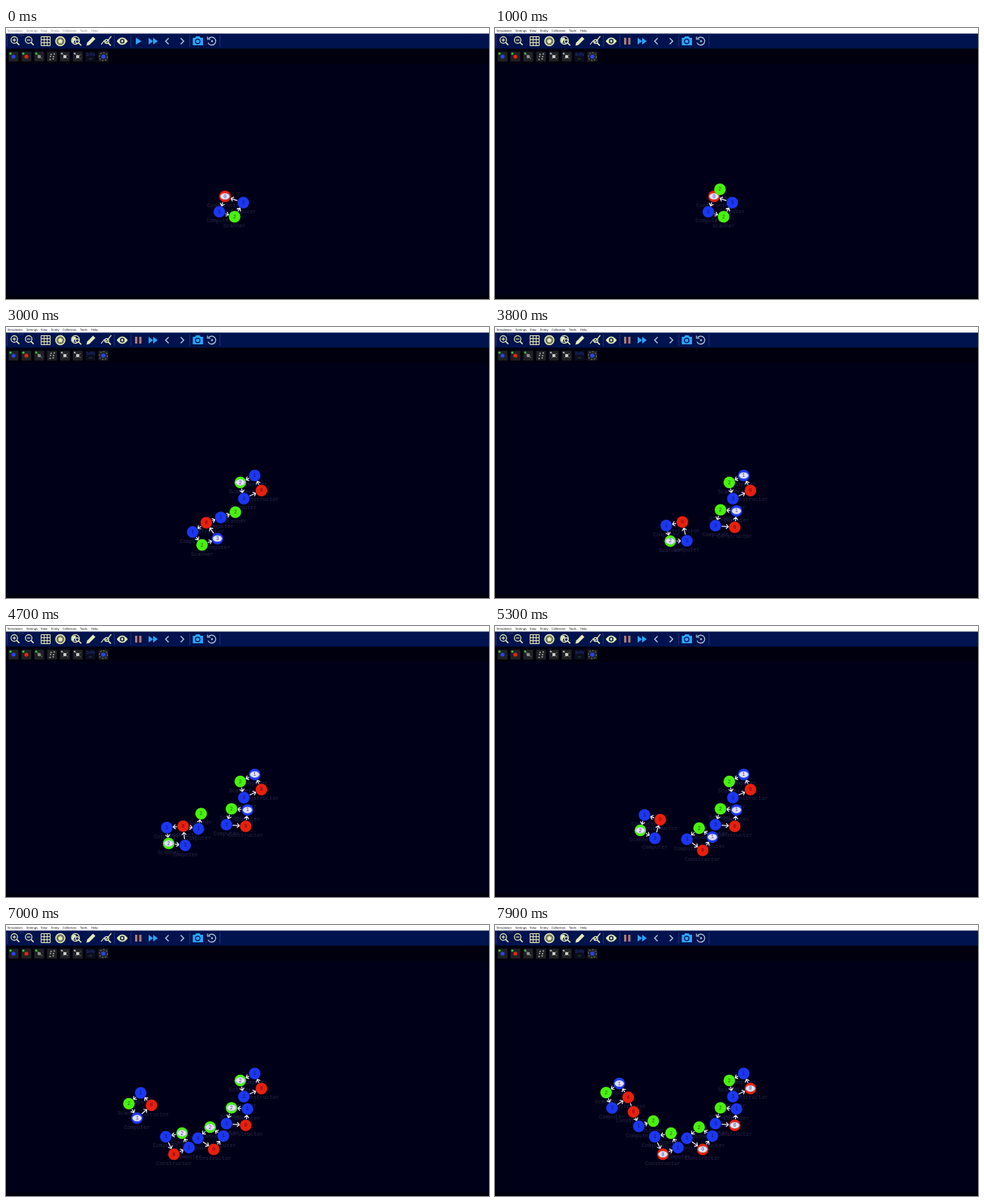
Write an HTML page with a canvas that moves like this. It is 640 px wide and 360 px high and loops after 8000 ms.

```html
<!DOCTYPE html>
<html lang="en">
<head>
<meta charset="utf-8">
<title>Cell replication</title>
<style>
html, body { margin: 0; width: 100%; height: 100%; overflow: hidden; background: #000018; }
canvas { display: block; }
</style>
</head>
<body>
<canvas id="stage" width="640" height="360"></canvas>
<script>
const g = document.getElementById('stage').getContext('2d');
const LOOP = 8000, FRAME = 100, START = 300;
const CREAM = '#e6edb8', SKY = '#2ba4ff', PALE = '#b4cbe4', BAR = '#00134e';
const MONO = '"Liberation Mono", monospace', SANS = '"Open Sans", sans-serif';

const COLORS = ['#e9200d', '#1b37f2', '#48f20c', '#1b37f2'];
const LABELS = ['Constructor', 'Computer', 'Scanner', 'Computer'];
const BUILD = [2, 1, 0, 3];              // order in which a child's cells appear
const CYCLE = 16, TURN = 30;             // steps and degrees from one child to the next
const HUB = [236.8, 202.9], ORBIT = 87;  // children settle on this circle
const LINK = 20.5;

// time in ms, simulation step
const CLOCK = [[START, 0], [1000, 4], [1700, 10.5], [3000, 27.5],
  [4700, 42.5], [6000, 59.5], [7000, 67.5], [7900, 77.5]];

const clamp = v => Math.max(0, Math.min(1, v));
const mix = (a, b, k) => a + (b - a) * k;

function stepAt(t) {
  const i = Math.max(1, CLOCK.findIndex(c => c[0] >= t));
  const [t0, u0] = CLOCK[i - 1], [t1, u1] = CLOCK[i];
  return mix(u0, u1, clamp((t - t0) / (t1 - t0)));
}

function polar([x, y], r, deg) {
  const a = deg * Math.PI / 180;
  return [x + r * Math.cos(a), y + r * Math.sin(a)];
}

function shape(d, stroke, fill, width = 1.2) {
  const p = new Path2D(d);
  if (fill) { g.fillStyle = fill; g.fill(p); }
  if (stroke) { g.strokeStyle = stroke; g.lineWidth = width; g.stroke(p); }
}

function oval(x, y, rx, ry, fill, stroke, width = 1.2) {
  g.beginPath();
  g.ellipse(x, y, rx, ry, 0, 0, 7);
  if (fill) { g.fillStyle = fill; g.fill(); }
  if (stroke) { g.strokeStyle = stroke; g.lineWidth = width; g.stroke(); }
}

const dot = (x, y, r, color) => oval(x, y, r, r, color);

function box(x, y, w, h, color) {
  g.fillStyle = color;
  g.fillRect(x, y, w, h);
}

function text(s, x, y, size, color, family = MONO, align = 'center') {
  g.font = `${size}px ${family}`;
  g.fillStyle = color;
  g.textAlign = align;
  g.textBaseline = 'middle';
  g.fillText(s, x, y);
}

function lens(x, y, r) {
  oval(x, y, r, r, null, CREAM, 1.2);
  shape(`M${x + r * .7} ${y + r * .7}l3.6 3.6`, CREAM, null, 1.6);
}

function drawMenu(faint) {
  box(0, 0, 640, 7.4, '#fff');
  const items = { Simulation: 2, Settings: 27, View: 46, Entity: 60, Collection: 75, Tools: 98, Help: 113 };
  for (const s in items) text(s, items[s], 3.6, 4, faint ? '#777' : '#000', SANS, 'left');
}

function drawToolbar(playing) {
  box(0, 7, 640, 20.4, BAR);
  text('75 fps', 6, 10, 5, '#35466f', MONO, 'left');
  for (const x of [1.5, 143.5, 165.5, 243.5, 283.5]) shape(`M${x} 10v15`, '#1c2c7c', null, 1);

  for (const x of [11, 30]) {
    lens(x, 16, 4.3);
    shape(`M${x - 2.2} 16h4.4`, CREAM);
  }
  shape('M11 13.8v4.4', CREAM);
  shape('M46.5 11.5h12v12h-12zM50.5 11.5v12M54.5 11.5v12M46.5 15.5h12M46.5 19.5h12', CREAM, null, 1);
  oval(72, 17.5, 6, 6, '#71765d', CREAM, 1.5);
  shape('M72 14.5l3 2.2-1.2 3.5h-3.6l-1.2-3.5z', null, CREAM);
  oval(92, 16.5, 5.2, 5.2, null, CREAM);
  shape('M88 13.5l4-1 1 3-3 2 1 3-4-2z', null, CREAM);
  lens(94.5, 18, 2.3);
  shape('M106.5 23.5l1-4 7.8-8 3.2 3-8 8z', null, CREAM);
  shape('M126 22l4-5 3 2 6.5-8', CREAM);
  lens(133.5, 18, 2.6);
  shape('M147 17.5q7-9 14 0q-7 9-14 0z', CREAM, CREAM, 1);
  dot(154, 17.5, 3.2, '#26364e');
  dot(154, 17.5, 1.4, CREAM);

  if (playing) for (const x of [171, 176.5]) box(x, 13, 3, 9, '#b47870');
  else shape('M172 13v9l7.5-4.5z', null, SKY);
  shape('M189 13v9l6-4.5zM195 13v9l6-4.5z', null, SKY);
  shape('M215.5 13.5l-4 4 4 4M231.5 13.5l4 4-4 4', PALE, null, 1.4);
  shape('M247.5 13h3l1.5-2h4.5l1.5 2h3v10h-13.5z', null, SKY);
  oval(254, 17.8, 3, 3, SKY, BAR);
  shape('M268.5 14a5.3 5.3 0 1 1-.8 5.5M267 11.5v3.5h4', PALE);
  dot(273, 17.5, 1.3, PALE);
}

// small entity icons, each drawn around its own centre
const TOOLS = [
  () => { dot(0, 0, 2.6, '#2944e8'); dot(-4, -4, 1.6, '#35c83a'); },
  () => { dot(0, 0, 2.6, '#e3280f'); dot(-4, -4, 1.6, '#35c83a'); },
  () => { shape('M-4-4l8 7', '#777', null, 1); dot(0, 0, 2.3, '#8b8d8b'); dot(-4, -4, 1.4, '#35c83a'); },
  () => { for (let i = 0; i < 6; i++) dot(...polar([0, 0], 2 + i % 3 * 1.3, i * 62), 1, '#aaa'); },
  hub, hub,
  () => { text('Info', 0, -2, 5, '#2740b4'); text('on', 0, 3, 4, '#286a46'); },
  () => {
    dot(0, 0, 2.8, '#2944e8');
    g.setLineDash([2, 2]);
    oval(0, 0, 5.3, 5.3, null, '#779077', 1);
    g.setLineDash([]);
  }
];

function hub() {
  shape('M-4-4l8 7M4-3l-7 6', '#70706c', null, 1);
  dot(0, 0, 2.2, '#ccc');
  dot(-4, -4, 1.3, '#aaa');
}

function drawTools() {
  box(0, 27, 640, 21, '#00000e');
  TOOLS.forEach((icon, i) => {
    g.save();
    g.translate(10 + 17 * i, 38);
    box(-6.5, -6.5, 13, 13, i === 6 ? '#0d0d20' : '#202125');
    icon();
    g.restore();
  });
}

// four cells around a centre, slightly kite-shaped
function ringCell(center, angle, n) {
  return polar(center, [16, 16, 14, 18][n], angle - 90 * n + [-4, 0, 0, 4][n]);
}

// The parent circles the hub, jerks forward after releasing a child and drifts back.
function parentCell(u, n) {
  u = Math.max(u, 4);
  const p = u % CYCLE, recoil = clamp(Math.min(p / 1.5, (14 - p) / 10));
  const around = 17.5 + u * TURN / CYCLE + 5 * recoil;
  return ringCell(polar(HUB, 80 - 10 * recoil, around), around - 149 + 6 * recoil, n);
}

// Joints stretch to let the next cell in and stay folded afterwards.
const fold = age => age > 4 ? Math.min(1, age - 4) : clamp(1 - Math.abs(age - 2.5));

// A chain from the parent's constructor, newest cell first, that closes into a ring.
function childCells(index, u) {
  const p = u - CYCLE * index, count = Math.min(4, Math.floor(p / 4));
  const around = 6 + TURN * index, home = polar(HUB, ORBIT, around);
  const settle = clamp((p - CYCLE) / 1.5), cells = [];
  let spot = parentCell(u, 0), dir = TURN * index - 50;
  for (let i = count - 1; i >= 0; i--) {
    const n = BUILD[i], newest = i === count - 1;
    if (!newest) dir -= 90 * fold(p - 4 * (i + 2));
    spot = polar(spot, newest ? LINK * clamp(.6 + (p - 4 * count) * .4) : LINK, dir);
    const end = ringCell(home, around + 17, n);
    cells.push({ n, pos: spot.map((v, k) => mix(v, end[k], settle)) });
  }
  return cells;
}

function drawLink(a, b) {
  const deg = Math.atan2(b.pos[1] - a.pos[1], b.pos[0] - a.pos[0]) * 180 / Math.PI;
  const to = polar(b.pos, -8.3, deg);
  g.beginPath();
  g.moveTo(...polar(a.pos, 8.3, deg));
  g.lineTo(...to);
  if ((a.n + 1) % 4 === b.n) for (const side of [-42, 42]) {
    g.moveTo(...to);
    g.lineTo(...polar(to, -4.5, deg + side));
  }
  g.strokeStyle = '#eeeef6';
  g.lineWidth = 1.2;
  g.stroke();
}

function drawCell({ n, pos: [x, y], active }) {
  dot(x, y, 7.7, COLORS[n]);
  if (active) oval(x, y, 6, 4, '#e2e2f4', '#b4b8e6', .7);
  text(n, x, y + .3, 6.5, active ? '#4a4aa0' : 'rgba(0,0,35,.6)');
}

function drawColony(u) {
  const step = Math.floor(u), cells = [], links = [];
  const addRing = (group, token) => {
    for (const c of group) {
      c.active = c.n === token % 4;
      links.push([c, group.find(o => o.n === (c.n + 1) % 4)]);
    }
  };
  const parent = BUILD.map(n => ({ n, pos: parentCell(u, n) }));
  addRing(parent, step);
  cells.push(...parent);
  for (let i = 0; CYCLE * i + 4 <= u; i++) {
    const group = childCells(i, u);
    cells.push(...group);
    if (group.length === 4) addRing(group, step + 3);
    else group.forEach((c, j) => links.push([group[j - 1] || parent.find(o => o.n === 0), c]));
  }
  for (const { n, pos: [x, y] } of cells) text(LABELS[n], x, y + 12.3, 7.1, '#28284a');
  links.forEach(l => drawLink(...l));
  cells.forEach(drawCell);
}

function draw(now) {
  const t = Math.floor(now % LOOP / FRAME) * FRAME;
  box(0, 0, 640, 360, '#000018');
  box(0, 355, 640, 5, '#00000e');
  drawTools();
  drawToolbar(t >= START);
  drawMenu(t < START);
  drawColony(stepAt(t));
}

const began = performance.now();
function tick() {
  draw(performance.now() - began);
  requestAnimationFrame(tick);
}
tick();
</script>
</body>
</html>
```
